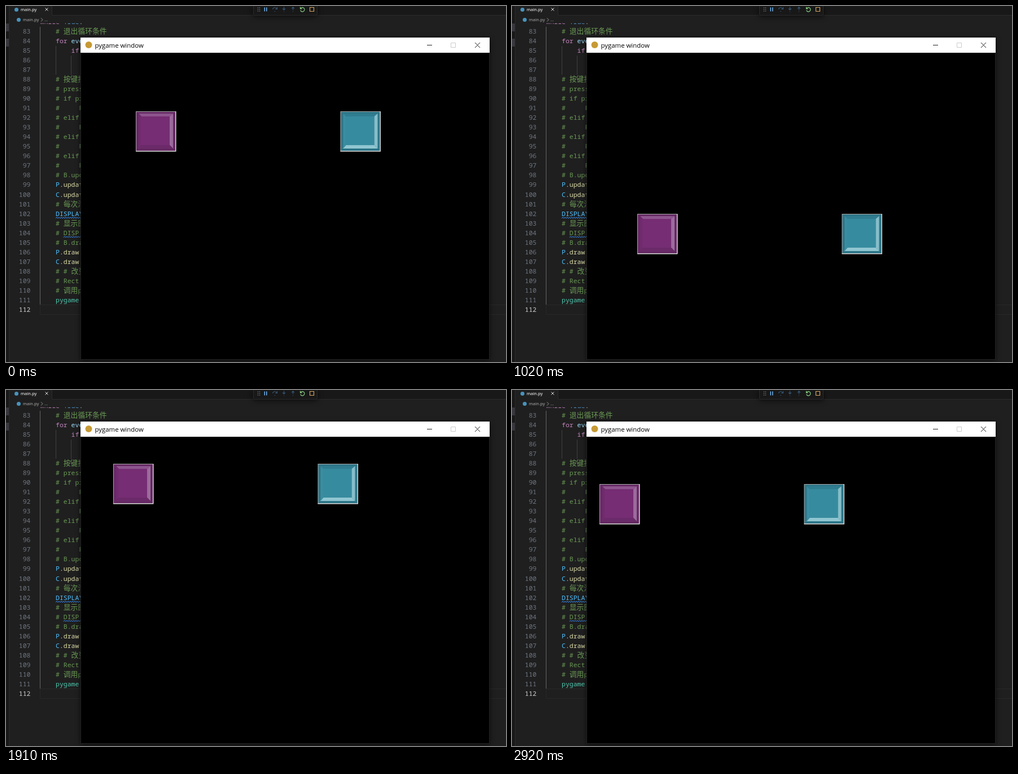
These frames come from a looping animation (886 px wide and 632 px high, 3400 ms). An HTML page:

```html
<!DOCTYPE html>
<html lang="en">
<head>
<meta charset="utf-8">
<title>Moving blocks</title>
<style>
  html, body { margin: 0; width: 100%; height: 100%; overflow: hidden; background: #1f1f1f; }
  svg { display: block; }
  text { white-space: pre; }
  .ui { font: 500 7.6px "Noto Sans", sans-serif; }
  .code { font: 500 11.5px "Noto Sans Mono", monospace; }
  .zh { font: 300 12.8px "Noto Sans CJK SC", "Noto Sans CJK", sans-serif; }
  .line { fill: none; }
  .window { filter: drop-shadow(0 2px 5px #0009); }
  .bevel { filter: blur(.5px); }
</style>
</head>
<body>
<svg width="886" height="632" viewBox="0 0 886 632">
  <defs>
    <clipPath id="scrolled"><path d="M0 30.5H886V632H0z"/></clipPath>
  </defs>

  <!-- editor -->
  <path fill="#1f1f1f" d="M0 0H886V632H0z"/>
  <path fill="#181818" d="M0 0H5V632H0zM82 0H886V16H82z"/>
  <path fill="#37373d" d="M0 31H5V45H0zM0 58H5V72H0z"/>
  <path class="line" stroke="#2b2b2b" d="M5.5 0V632M81.5 0V16.5H886"/>
  <path class="line" stroke="#282828" d="M886 530.5H60.5V547.5H886"/>
  <path class="line" stroke="#404040" d="M88.5 71V122M115.5 88V122"/>
  <path class="line" stroke="#666" d="M60.5 37V530"/>
  <g id="code" class="code" clip-path="url(#scrolled)"></g>

  <g class="ui">
    <circle cx="18.5" cy="6.5" r="3.5" fill="#4793bd"/>
    <text x="26" y="9" fill="#fff">main.py</text>
    <path class="line" stroke="#ddd" d="M69.5 3.5l5 5m0-5l-5 5"/>
    <circle cx="22.5" cy="24.5" r="3.5" fill="#4793bd"/>
    <text x="30" y="27" fill="#a9a9a9">main.py</text>
    <path class="line" stroke="#a9a9a9" stroke-width=".9" d="M62 21.5l3 3-3 3"/>
    <text x="68" y="27" fill="#a9a9a9">...</text>
  </g>

  <!-- debug toolbar -->
  <path fill="#181818" stroke="#2b2b2b" class="window" d="M438.5-2H551.5V14Q551.5 16.5 549 16.5H441Q438.5 16.5 438.5 14z"/>
  <path class="line" stroke="#888" stroke-width="1.3" stroke-dasharray="1.3 1.7" d="M446.5 2.5v8M449.5 2.5v8"/>
  <path class="line" stroke="#75beff" stroke-width="1.4" d="M458.3 2.5v7M461.8 2.5v7"/>
  <g class="line" stroke="#35587a" stroke-width="1.1">
    <path d="M472.5 6a4 4 0 0 1 7.5-1M480.5 2v3.5H477M492.5 1.5v5.5M490 4.5l2.5 2.5 2.5-2.5M508.5 7.5V2M506 4.5l2.5-2.5 2.5 2.5"/>
    <path d="M475.5 9.5h1.5M492 10h1M508 10h1"/>
  </g>
  <path class="line" stroke="#89d185" stroke-width="1.2" d="M522 4.5a3.7 3.7 0 1 1-.3 3M521.5 1.8v3H524.5"/>
  <path class="line" stroke="#d5a45f" stroke-width="1.2" d="M538.5 2.5h7v7h-7z"/>

  <!-- game window -->
  <path class="window" d="M132 56H857V628H132z" fill="#222"/>
  <path fill="#fff" d="M132 56H857V83H132z"/>
  <path fill="#000" d="M133 83H856V627H133z"/>
  <circle cx="146.5" cy="69" r="6" fill="#c79a35"/>
  <text x="157.5" y="73.5" font-family="Open Sans, sans-serif" font-size="11.4">pygame window</text>
  <path class="line" stroke="#222" d="M746 69.5H755M831 65l9 9m0-9l-9 9"/>
  <path class="line" stroke="#ccc" d="M788.5 65.5h8v8h-8z"/>
  <g id="blocks"></g>
</svg>
<script>
const COMMENT = '#6a9955', KEYWORD = '#c586c0', CONSTANT = '#4fc1ff', CALL = '#dcdcaa';
const PITCH = 17.03, CHAR = 6.9, LEFT = 88;
const $ = id => document.getElementById(id);

// Editor text
const source = `    # 退出循环条件
    for eve
        if


    # 按键控
    # press
    # if pr
    #     P
    # elif
    #     P
    # elif
    #     P
    # elif
    #     P
    # B.upd
    P.updat
    C.updat
    # 每次清
    DISPLAY
    # 显示图
    # DISP
    # B.dra
    P.draw
    C.draw
    # # 改变
    # Rect
    # 调用py
    pygame
`.split('\n');

const span = (text, color) => `<tspan fill="${color}">${text}</tspan>`;

function highlight(line) {
  if (line.includes('#'))
    return span(line.replace(/[\u4e00-\u9fff]+/g, '<tspan class="zh">$&</tspan>'), COMMENT);
  return line
    .replace(/^(\s*)(for|if)( ?)(.*)/, (_, pad, word, gap, rest) =>
      pad + span(word, KEYWORD) + gap + span(rest, '#9cdcfe'))
    .replace(/([PC])\.(\w+)/, (_, name, call) =>
      span(name, CONSTANT) + span('.', '#ccc') + span(call, CALL))
    .replace('DISPLAY', span('DISPLAY', CONSTANT))
    .replace('pygame', span('pygame', '#4ec9b0'));
}

function squiggle(x, y) {
  let d = `M${x} ${y}`;
  for (let i = 0; x + i * 4 < 132; i++) d += 'l2-2l2 2';
  return `<path class="line" stroke="#3794ff" d="${d}"/>`;
}

$('code').innerHTML =
  `<text x="60.5" y="32">${span('while', KEYWORD)} ${span('True', '#569cd6')}${span(':', '#ccc')}</text>` +
  source.map((line, i) => {
    const y = 49 + i * PITCH, number = 83 + i;
    return `<text x="43.5" y="${y}" text-anchor="end" fill="${number === 112 ? '#ccc' : '#6e7681'}">${number}</text>` +
      `<text x="${LEFT - 4 * CHAR}" y="${y}">${highlight(line)}</text>`;
  }).join('') + squiggle(LEFT, 377) + squiggle(LEFT + 2 * CHAR, 411);

// Bevelled block: rim, face, then the top, right, bottom and left bevels
function block(rim, face, top, right, bottom, left) {
  const shape = (color, d) => `<path fill="${color}" d="${d}"/>`;
  return '<g>' +
    shape('#aaa', 'M0 0H71V71H0z') +
    shape('#ddd', 'M70 0H71.5V71.5H0V70H70z') +
    shape(rim, 'M1 1H70V70H1z') +
    '<g class="bevel">' +
    shape(top, 'M5 4H66L60 9H10z') +
    shape(right, 'M66 4V66L60 60V9z') +
    shape(bottom, 'M66 66H4L10 60H60z') +
    shape(left, 'M5 66V4L10 9V60z') +
    shape(face, 'M9 9H60V60H9z') + '</g></g>';
}

$('blocks').innerHTML =
  block('#662a64', '#762d73', '#8d558d', '#9b6b9c', '#6b2a69', '#702b6e') +
  block('#2d7688', '#378b9f', '#307d90', '#87bdc9', '#90c6d1', '#3b8da1');
const [purple, teal] = $('blocks').children;

// Moments at which the picture steps forward, in ms
const LOOP = 3400;
const steps = [
  0, 300, 380, 460, 540, 620, 700, 780,
  860, 940, 1020, 1090, 1160, 1240, 1320,
  1420, 1500, 1590, 1670, 1750, 1830, 1910,
  1980, 2060, 2140, 2220, 2300, 2390, 2470,
  2530, 2630, 2700, 2770, 2850, 2920
];

// Path of the purple block: step, x, y
const keys = [
  [0, 230, 187], [1, 240, 187], [4, 415, 190], [7, 278.5, 206],
  [10, 222, 369], [13, 159, 306], [15, 203, 195], [17, 321, 152],
  [19, 235, 260], [20, 153, 200], [21, 190, 131], [24, 385, 204],
  [28, 273, 287], [29, 190, 218], [31, 162, 182], [34, 155, 167]
];

function slope(i, axis) {
  const a = keys[i - 1], b = keys[i], c = keys[i + 1];
  if (!a || !c || (b[axis] - a[axis]) * (c[axis] - b[axis]) <= 0) return 0;
  return (c[axis] - a[axis]) / (c[0] - a[0]);
}

function position(step, axis) {
  const i = Math.min(keys.findLastIndex(key => key[0] <= step), keys.length - 2);
  const a = keys[i], b = keys[i + 1], length = b[0] - a[0], u = (step - a[0]) / length;
  const ease = u * u * (3 - 2 * u);
  return a[axis] + (b[axis] - a[axis]) * ease +
    length * u * (1 - u) * (slope(i, axis) * (1 - u) - slope(i + 1, axis) * u);
}

function draw() {
  const time = performance.now() % LOOP;
  const step = steps.findLastIndex(start => start <= time);
  const x = position(step, 1), y = position(step, 2);
  purple.setAttribute('transform', `translate(${x} ${y})`);
  teal.setAttribute('transform', `translate(${x + 362.5} ${y})`);
  requestAnimationFrame(draw);
}
draw();
</script>
</body>
</html>
```
